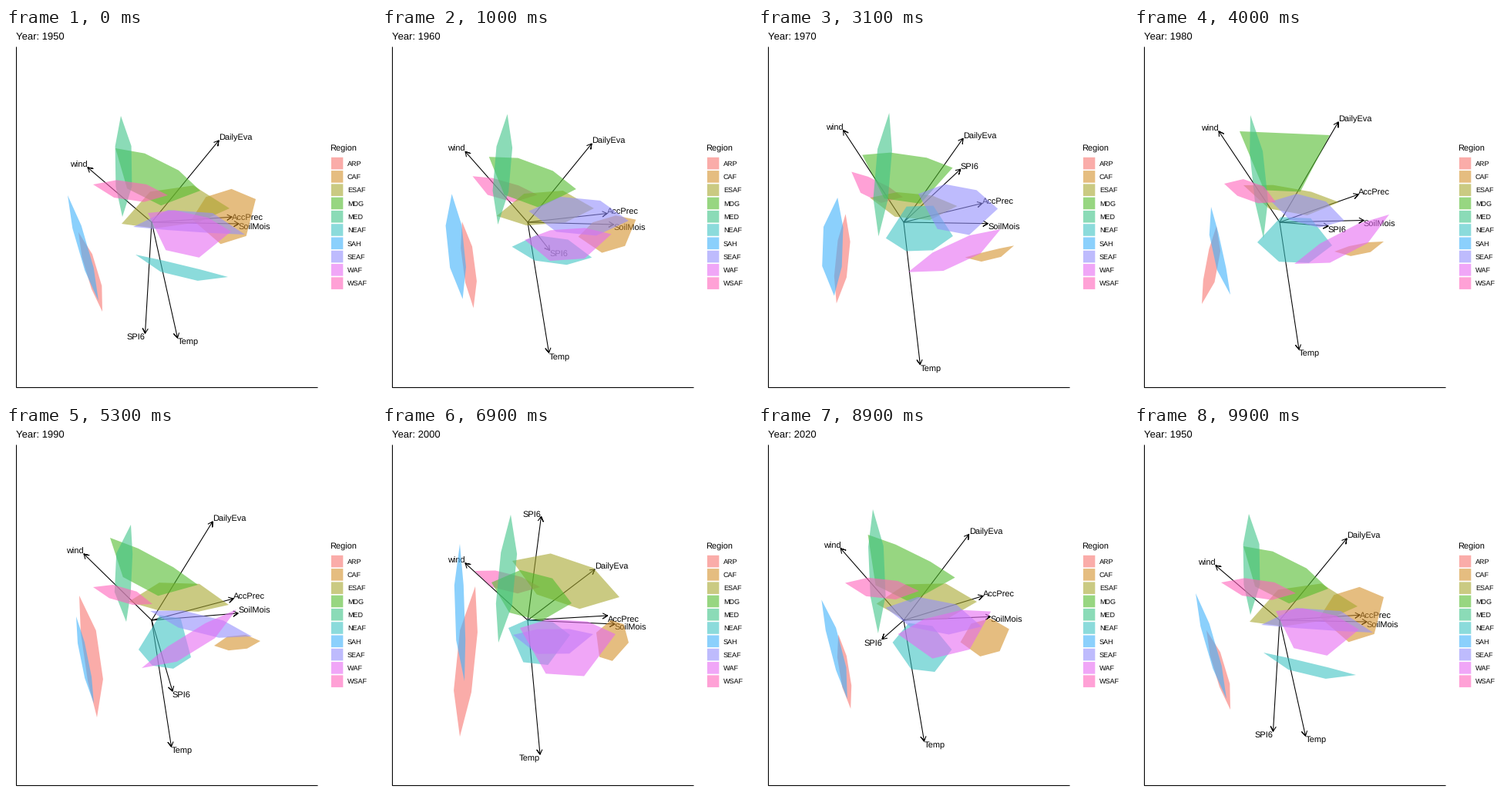
Recreate the animation shown at these times as a matplotlib script. Size 480x480 px, loop 10000 ms.

```python
import numpy as np
import matplotlib.pyplot as plt
from matplotlib.animation import FuncAnimation
from matplotlib.colors import to_rgb
from matplotlib.patches import Polygon, Rectangle

SIZE, DPI = 480, 72
FRAMES, INTERVAL = 100, 100
ALPHA = 0.6
ORIGIN = np.array([189.0, 252.0])
MID_X, MID_Y = 208.6, 245.0
CAP = 7.9          # cap height of the arrow labels
HEAD = 7.0         # arrowhead edge length
YEARS = range(1950, 2030, 10)
# (last still frame, arrival frame) of each move to the next state
MOVES = [(4, 14), (17, 27), (30, 40), (43, 53),
         (55, 65), (68, 77), (80, 89), (92, 99)]

plt.rcParams.update({"font.family": "Liberation Sans",
                     "text.hinting": "none", "text.hinting_factor": 1})
fig = plt.figure(figsize=(SIZE / DPI, SIZE / DPI), dpi=DPI, facecolor="white")
ax = fig.add_axes([0, 0, 1, 1])
ax.set_xlim(0, SIZE)
ax.set_ylim(SIZE, 0)
ax.axis("off")


def sliver(x0, y0, x1, y1, left, right):
    """Hexagon on a spine, bulging to either side of it."""
    a, b = np.array([x0, y0], float), np.array([x1, y1], float)
    d = b - a
    n = np.array([d[1], -d[0]]) / np.hypot(*d)
    near, far = a + 0.3 * d, a + 0.7 * d
    return np.array([a, near + left * n, far + left * n,
                     b, far - right * n, near - right * n])


def eight_states(a, b, c, d, e, f):
    """Spread six key poses over the eight states.

    b lies 40 % into the second move, e and f one ninth into theirs.
    """
    drift = 0.3 * (c - a)
    last = f + 0.4 * (a - f)
    s2010 = (9 * f - last) / 8
    s2000 = (9 * e - s2010) / 8
    return [a, b - 0.4 * drift, b + 0.6 * drift, c, d, s2000, s2010, last]


regions = []


def region(name, tint, *poses):
    """tint is the colour as seen on white."""
    rgb = np.clip((np.array(to_rgb(tint)) - 1 + ALPHA) / ALPHA, 0, 1)
    states = eight_states(*[sliver(*p) for p in poses])
    style = dict(fc=(*rgb, ALPHA), ec="none", lw=0)
    patch = ax.add_patch(Polygon(states[0], closed=True, **style))
    row = 175.6 + 17.28 * len(regions)
    ax.add_patch(Rectangle((421.9, row - 7.8), 15.4, 15.6, snap=False,
                           **style))
    ax.text(442.8, row + 3.2, name, size=8.8)
    regions.append((patch, states))


region("ARP", "#fbada9",
       (94, 265, 125, 368, 9, 5), (112, 241, 110, 359, 9, 7),
       (107, 257, 88, 358, 11, 4), (95, 220, 118, 378, 15, 5),
       (121, 208, 101, 403, 9, 14), (111, 274, 117, 366, 4, 7))
region("CAF", "#e6bd80",
       (241, 248, 324, 222, 22, 42), (266, 291, 333, 273, 4, 16),
       (260, 290, 324, 277, 3, 10), (270, 285, 330, 279, 10, 8),
       (278, 268, 320, 281, 21, 29), (277, 302, 327, 291, 18, 13))
region("ESAF", "#caca82",
       (150, 254, 290, 234, 36, 12), (147, 231, 262, 233, 16, 19),
       (142, 204, 266, 226, 7, 24), (159, 228, 289, 232, 26, 10),
       (169, 175, 308, 222, 25, 31), (156, 215, 280, 224, 17, 29))
region("MDG", "#97d781",
       (142, 156, 252, 211, 11, 40), (136, 172, 252, 199, 11, 43),
       (137, 134, 254, 139, 0, 75), (135, 145, 249, 206, 5, 37),
       (142, 203, 246, 230, 25, 32), (143, 131, 258, 187, 0, 64))
region("MED", "#8bdbb7",
       (149, 114, 151, 245, 13, 8), (172, 110, 152, 265, 8, 12),
       (151, 113, 168, 273, 11, 6), (162, 128, 156, 254, 4, 17),
       (167, 115, 151, 281, 13, 8), (149, 104, 159, 285, 11, 8))
region("NEAF", "#8bdbdb",
       (168, 294, 288, 323, 1, 14), (168, 275, 258, 276, 35, 15),
       (160, 278, 257, 282, 34, 24), (172, 290, 240, 300, 48, 18),
       (164, 262, 244, 271, 14, 42), (179, 272, 227, 268, 46, 44))
region("SAH", "#8bd0fc",
       (80, 217, 120, 354, 6, 6), (100, 216, 95, 349, 10, 17),
       (100, 232, 125, 346, 2, 10), (91, 247, 114, 360, 4, 5),
       (101, 153, 107, 331, 3, 9), (84, 231, 113, 354, 11, 4))
region("SEAF", "#bfbcfe",
       (165, 258, 310, 268, 25, 1), (209, 220, 322, 236, 20, 40),
       (178, 225, 273, 250, 18, 17), (187, 240, 319, 273, 11, 12),
       (170, 271, 274, 270, 7, 25), (166, 221, 277, 255, 20, 30))
region("WAF", "#f0a6f8",
       (184, 240, 292, 264, 11, 42), (189, 306, 306, 267, 10, 20),
       (208, 306, 331, 242, 8, 20), (176, 314, 299, 238, 6, 17),
       (179, 262, 303, 270, 14, 57), (180, 290, 309, 225, 12, 45))
region("WSAF", "#ffa1d6",
       (113, 203, 210, 217, 10, 13), (121, 185, 193, 217, 2, 21),
       (117, 202, 184, 226, 14, 9), (113, 209, 190, 231, 10, 8),
       (120, 188, 205, 209, 7, 15), (113, 204, 208, 212, 10, 15))

arrows = []


def arrow(name, *tips):
    line, = ax.plot([], [], color="black", lw=1.07, zorder=2,
                    solid_capstyle="butt", solid_joinstyle="round")
    label = ax.text(0, 0, name, size=11, zorder=2)
    arrows.append((line, label, eight_states(*np.array(tips, float))))


arrow("wind", (106, 181), (110, 141), (110, 134),
      (101, 166), (108, 178), (108, 144))
arrow("DailyEva", (276, 146), (268, 150), (265, 122),
      (268, 124), (276, 186), (272, 137))
arrow("AccPrec", (293, 245.2), (291, 234), (291, 216),
      (295, 224), (292.5, 246), (291, 204))
arrow("SoilMois", (302, 254), (299, 255), (298, 249.5),
      (301, 243), (302, 257), (301, 243))
arrow("SPI6", (180.5, 396), (251, 200), (252, 257),
      (216, 344), (206.5, 117.5), (148, 197))
arrow("Temp", (222.5, 402), (211.5, 436), (214, 417),
      (214.5, 416), (205, 426), (211, 413.5))

ax.plot([13, 13, 404], [23.5, 466, 466], color="black", lw=1.07,
        solid_capstyle="butt", solid_joinstyle="miter")
ax.text(420.2, 160, "Region", size=11)
title = ax.text(13, 15, "", size=13.2)


def place_arrow(line, label, tip):
    back = ORIGIN - tip
    angle = np.arctan2(back[1], back[0])
    barbs = [tip + HEAD * np.array([np.cos(a), np.sin(a)])
             for a in (angle - np.pi / 6, angle + np.pi / 6)]
    line.set_data(*np.array([ORIGIN, tip, barbs[0], tip, barbs[1]]).T)
    # labels are justified away from the panel centre
    x, y = tip
    if abs(y - MID_Y) < 0.45:
        drop = CAP / 2
    else:
        drop = CAP if y > MID_Y else 0
    label.set_position((x, y + drop))
    label.set_ha("left" if x > MID_X else "right")


def locate(i):
    """State index and linear progress to the next one."""
    for s, (start, end) in enumerate(MOVES):
        if i < end:
            return s, max(0, i - start) / (end - start)
    return 0, 0.0


def draw(i):
    s, t = locate(i)
    n = (s + 1) % len(MOVES)
    title.set_text(f"Year: {YEARS[s if t < 0.5 else n]}")
    # moving shapes stack by their number read as text: 1, 10, 2, 3 ...
    stack = sorted(range(1, len(regions) + 1), key=str if t else int)
    for k, (patch, states) in enumerate(regions, 1):
        patch.set_xy((1 - t) * states[s] + t * states[n])
        patch.set_zorder(3 + stack.index(k))
    for line, label, tips in arrows:
        place_arrow(line, label, (1 - t) * tips[s] + t * tips[n])
    return []


anim = FuncAnimation(fig, draw, frames=FRAMES, interval=INTERVAL,
                     init_func=lambda: draw(0), repeat=True, repeat_delay=0)
plt.show()
```
